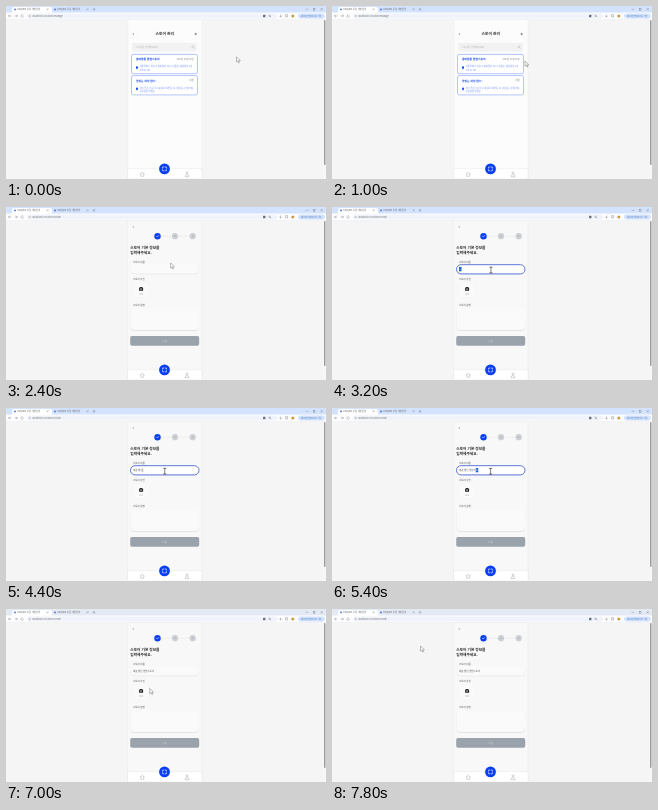
Recreate the animation shown at these times as an HTML page. Size 320 by 173 pixels, loop 8 s.

```html
<!DOCTYPE html>
<html lang="ko">
<head>
<meta charset="utf-8">
<style>
html, body { margin: 0; width: 100%; height: 100%; overflow: hidden; background: #f5f5f5; }
svg { display: block; width: 100vw; height: 100vh; font-family: "Noto Sans CJK KR", "Noto Sans CJK", sans-serif; }
.bold { font-weight: 700; }
.mid { text-anchor: middle; }
.end { text-anchor: end; }
.line { fill: none; stroke-linecap: round; stroke-linejoin: round; }
</style>
</head>
<body>
<svg id="stage" viewBox="0 0 320 173" preserveAspectRatio="none"></svg>
<script>
const LOOP = 8000;
const BLUE = '#0a3ff0', INK = '#2a2a2a';

const text = (x, y, size, str, fill = INK, cls = '') =>
  `<text x="${x}" y="${y}" font-size="${size}" fill="${fill}" class="${cls}">${str}</text>`;
const box = (x, y, w, h, r, fill, stroke = 'none', sw = 0.5) =>
  `<rect x="${x}" y="${y}" width="${w}" height="${h}" rx="${r}" fill="${fill}" stroke="${stroke}" stroke-width="${sw}"/>`;
const dot = (x, y, r, fill, stroke = 'none', sw = 0.5) =>
  `<circle cx="${x}" cy="${y}" r="${r}" fill="${fill}" stroke="${stroke}" stroke-width="${sw}"/>`;
const line = (d, stroke = '#777', sw = 0.4) =>
  `<path class="line" d="${d}" stroke="${stroke}" stroke-width="${sw}"/>`;

function tab(x, active) {
  return (active ? box(x, 1, 40, 7, 2, '#fff') : '') + dot(x + 3, 3.4, 0.9, '#4169e1') +
    text(x + 5.3, 4.3, 2.3, 'Dailymo 로컬 개발환경', '#666') +
    line(`M${x + 35} 2.7l1.2 1.2m0-1.2l-1.2 1.2`);
}

function browser() {
  return `<rect id="strip" width="320" height="7"/>` + tab(6, true) + tab(46, false) +
    line('M87 3.3h2m-1-1v2M300 3.3h2M314.8 2.4l1.8 1.8m0-1.8l-1.8 1.8') +
    box(307.2, 2.4, 1.8, 1.8, 0, 'none', '#777', 0.4) +
    box(0, 6.5, 320, 7, 0, '#fdfdff') + box(21, 7.5, 250, 5, 2.5, '#f0f3fa') +
    line('M5 10h-2.4m1-1l-1 1 1 1M9 10h2.4m-1-1l1 1-1 1M17.3 9.4a1.3 1.3 0 1 0 .1 1.2') +
    dot(23.6, 10, 0.7, 'none', '#888', 0.4) +
    `<text id="url" x="26" y="10.9" font-size="2.25" fill="#666"></text>` +
    box(257, 8.8, 2.4, 2.4, 0.5, '#68717d') + dot(263.6, 9.7, 0.8, 'none', '#777', 0.4) +
    line('M264.2 10.3l.7.7M274.5 9v2M273.5 10l1 1 1-1M279.6 9v2h2V9z') +
    dot(286.8, 10, 1.5, '#c99a40') + box(292, 7.6, 27, 4.9, 2.4, '#d3e3fd') +
    text(305.2, 10.9, 2.3, '새 버전 업데이트 가능', '#4a72b5', 'mid') +
    line('M0 13.5H320', '#e2e5e9', 0.3) +
    box(317.6, 13.7, 2.4, 160, 0, '#f7f7f7') + box(318, 14, 1.5, 145, 0.7, '#9c9c9c');
}

function card(y, title, date, rows) {
  return box(125.5, y, 66, 19.3, 1.8, '#fff', '#85a0f6', 0.6) +
    text(130, y + 6, 2.75, title, BLUE, 'bold') + text(187.5, y + 5.2, 2.2, date, '#777', 'end') +
    `<path d="M130 ${y + 12.9}a1 1 0 0 1 2 0q0 .9-1 2.2-1-1.3-1-2.2z" fill="${BLUE}"/>` +
    rows.map((row, i) => text(133.5, y + 13 + i * 3.1, 2.3, row, '#6b8bf2')).join('');
}

function listPage() {
  return box(122, 13.7, 74, 160, 0, '#fcfcfc', '#e8e8e8', 0.4) +
    box(124.3, 24.8, 6, 6.4, 1.5, '#fff', '#eee', 0.3) + box(186.5, 24.8, 6, 6.4, 1.5, '#fff', '#eee', 0.3) +
    line('M127.6 27.2l-.8.8.8.8M188.8 28h1.8m-.9-.9v1.8', '#444', 0.5) +
    text(158.7, 29.4, 3.75, '스토어 관리', INK, 'bold mid') +
    box(126, 36.8, 65, 8.6, 2, '#f2f2f2') + text(129.5, 41.9, 2.4, '스토어를 검색해보세요', '#b5b5b5') +
    dot(186.8, 40.8, 1, 'none', '#b0b0b0', 0.4) + line('M187.6 41.6l.8.8', '#b0b0b0') +
    card(48.4, '솔바람돌 팝업스토어', '2024년 09월 18일',
      ['서울특별시 하늘구 솔바람로 123 (구름동) 햇살빌딩 1층', '스토어 1호']) +
    card(69.6, '맛있는 과자 팝스~', '미정',
      ['경기 푸른시 나무구 햇살로 45번길 12 (하늘동, 산들타워)', '구름광장 팝업존']);
}

function step(x, n) {
  return dot(x, 29.2, 3.1, '#ccd0d4') + text(x, 30.1, 2.5, n, '#888', 'mid');
}

function formPage() {
  return box(121.5, 13.7, 74.5, 160, 0, '#f8f8f8', '#e6e6e6', 0.4) +
    line('M127.6 19.1l-.8.8.8.8', '#555') +
    line('M155 29.2H166M172.5 29.2H183.5', '#ddd') +
    dot(151.5, 29.2, 3.2, BLUE) + line('M150.4 29.2l.8.8 1.5-1.6', '#fff', 0.5) +
    step(169, 2) + step(186.7, 3) +
    text(124.3, 41.9, 3.7, '스토어 기본 정보를', INK, 'bold') +
    text(124.3, 47.1, 3.7, '입력해주세요.', INK, 'bold') +
    text(127, 55.5, 2.4, '스토어 이름', '#444') +
    box(124.5, 58.3, 68.5, 9, 4.5, '#dedede') + box(124.5, 57.7, 68.5, 9, 4.5, '#fafafa') +
    `<rect id="focus" x="124.5" y="57.7" width="68.5" height="9.2" rx="4.6" fill="#fff" stroke="#4c68d4" stroke-width=".9"/>` +
    `<rect id="compose" y="60" width="2.5" height="4.3" fill="#1b60e0"/>` +
    `<text id="name" x="127" y="63.3" font-size="2.4" fill="#555"><tspan></tspan><tspan></tspan></text>` +
    `<rect id="caret" y="60.4" width=".3" height="3.8" fill="#222"/>` +
    text(127, 72.9, 2.4, '스토어 사진', '#444') +
    box(126.8, 76, 16.2, 14.5, 2.5, '#fafafa', '#f2f2f2', 0.4) +
    box(133.1, 80.6, 4, 3.2, 0.5, '#222') + box(134.1, 79.9, 2, 1.4, 0.3, '#222') +
    dot(135.1, 82.2, 0.85, '#ddd') + dot(135.1, 82.2, 0.55, '#222') +
    text(135.1, 88, 2.1, '0/1', '#777', 'mid') +
    text(127, 99.3, 2.4, '스토어 설명', '#444') +
    box(124.5, 102.4, 68.5, 21.3, 4, '#dedede') + box(124.5, 101.6, 68.5, 21.5, 4, '#fafafa') +
    box(124.2, 129, 69, 9.7, 1.8, '#9aa3ab') + text(158.7, 134.7, 2.5, '다음', '#d0d5d9', 'mid');
}

function navBar() {
  return `<path d="M121.7 162.7H151q1.5 0 2 1.5a6 6 0 0 0 11 0q.5-1.5 2-1.5H196V173H121.7z" fill="#fff" stroke="#e0e0e0" stroke-width=".4"/>` +
    line('M134.3 168l2-1.8 2 1.8M134.9 167.6v2.7h2.8v-2.7', '#999') +
    dot(181, 166.8, 1, 'none', '#999', 0.4) + line('M179 170.3q0-1.8 2-1.8t2 1.8z', '#999') +
    dot(158.5, 162.9, 5.4, BLUE) +
    line('M156.6 162.2v-1.2h1.2M159.2 161h1.2v1.2M160.4 163.6v1.2h-1.2M157.8 164.8h-1.2v-1.2', '#fff', 0.6);
}

const $ = id => document.getElementById(id);
$('stage').innerHTML = box(0, 0, 320, 173, 0, '#f5f5f5') +
  `<g id="list">${listPage()}</g><g id="form">${formPage()}</g>` + navBar() + browser() +
  `<path id="arrow" d="M0 0V5.2l1.2-1.1.9 2 .9-.4-.9-1.9h1.7z" fill="#fff" stroke="#555" stroke-width=".4"/>` +
  `<path id="beam" class="line" d="M-1.2-2.8h2.4M0-2.8V2.8M-1.2 2.8h2.4" stroke="#333" stroke-width=".6"/>`;

// time, x, y
const path = [
  [0, 230.5, 50.8], [200, 229, 51], [1000, 193, 55], [1200, 192, 54], [1450, 187.5, 27], [1900, 187.5, 27],
  [2600, 159, 63], [6200, 158.5, 63.3], [6400, 174.5, 69.3], [7100, 142, 80], [7450, 142, 80],
  [7800, 88.5, 37], [8000, 88.5, 37]
];
// time, committed text, syllable being composed
const typing = [
  [0, '', ''], [3200, '', 'ㅅ'], [3500, '', '새'], [3800, '새', '봄'], [4000, '새봄 ', '여'],
  [4200, '새봄 ', '열'], [4400, '새봄 열린', ''], [5000, '새봄 열린 ', '팝'],
  [5200, '새봄 열린 팝', '업'], [5400, '새봄 열린 팝업스', '토'], [5600, '새봄 열린 팝업스토', '어']
];

const show = (id, on) => $(id).setAttribute('visibility', on ? 'inherit' : 'hidden');

function pointer(t) {
  const i = path.findIndex((p, k) => k > 0 && t <= p[0]);
  const [t0, x0, y0] = path[i - 1], [t1, x1, y1] = path[i];
  const u = (t - t0) / (t1 - t0), e = u * u * (3 - 2 * u);
  return [x0 + (x1 - x0) * e, y0 + (y1 - y0) * e];
}

function draw(t) {
  const onForm = t >= 1600, focused = t >= 2900 && t < 6700;
  $('list').style.display = onForm ? 'none' : '';
  $('form').style.display = onForm ? '' : 'none';
  $('url').textContent = 'localhost:5173/store/' + (onForm ? 'create' : 'manage');
  $('strip').setAttribute('fill', t < 7000 ? '#d3e3fd' : '#e4eaf4');

  if (onForm) {
    const [, done, syllable] = typing.findLast(k => t >= k[0]);
    const [head, tail] = $('name').children;
    head.textContent = done;
    tail.textContent = syllable;
    tail.setAttribute('fill', focused ? '#fff' : '#555');
    const start = 127 + (done ? head.getComputedTextLength() : 0);
    $('compose').setAttribute('x', start);
    $('caret').setAttribute('x', start + 0.3);
    show('focus', focused);
    show('compose', focused && syllable);
    show('caret', focused && !syllable);
  }

  const [x, y] = pointer(t), overField = t >= 2500 && t < 6600;
  for (const id of ['arrow', 'beam']) $(id).setAttribute('transform', `translate(${x} ${y})`);
  show('beam', overField);
  show('arrow', !overField);
}

function tick(now) {
  draw(now % LOOP);
  requestAnimationFrame(tick);
}
draw(0);
requestAnimationFrame(tick);
</script>
</body>
</html>
```
